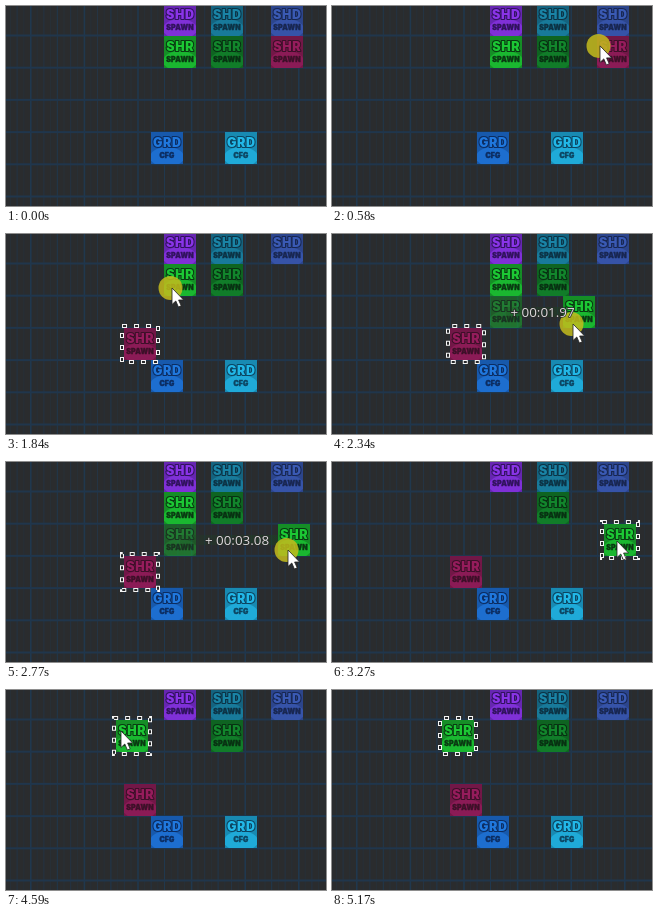
An HTML page for the animation above (5.26 s loop, 320 by 200 pixels).

```html
<!DOCTYPE html>
<html lang="en">
<head>
<meta charset="utf-8">
<title>Timeline drag</title>
<style>
  html, body { margin: 0; width: 100%; height: 100%; overflow: hidden; background: #2a2c2e; }
  svg { display: block; width: 320px; height: 200px; }
  text { text-anchor: middle; paint-order: stroke; stroke-linejoin: round; }
  .name { font: 900 12.5px Inter, sans-serif; letter-spacing: .6px; stroke-width: 2px; }
  .kind { font: 900 7px Inter, sans-serif; letter-spacing: .2px; stroke-width: .4px; }
  #label { font: 13.4px "Open Sans", sans-serif; fill: #dcdcdc; stroke: #2a2a2a; stroke-width: 1.5px; }
</style>
</head>
<body>
<svg id="stage" viewBox="0 0 320 200">
  <defs>
    <linearGradient id="minus">
      <stop offset="0" stop-color="#74181a"/>
      <stop offset=".75" stop-color="#941416"/>
      <stop offset="1" stop-color="#941416" stop-opacity=".5"/>
    </linearGradient>
    <linearGradient id="plus">
      <stop offset="0" stop-color="#1c4222" stop-opacity=".2"/>
      <stop offset="1" stop-color="#1c4222" stop-opacity=".6"/>
    </linearGradient>
    <clipPath id="tile"><rect width="32" height="32"/></clipPath>
  </defs>
  <g id="grid"></g>
  <g id="blocks"></g>
  <g id="drag">
    <g id="ghost" opacity=".5"></g>
    <rect id="bar" height="10"/>
    <g id="mover"></g>
  </g>
  <g id="select" fill="none">
    <rect width="36" height="36" stroke="#f4f4f4" stroke-width="4" stroke-dasharray="5 7"/>
    <rect width="36" height="36" stroke="#26282a" stroke-width="2" stroke-dasharray="3 9"/>
  </g>
  <g id="cursor">
    <circle id="press" cx="-1.5" r="12" fill="#c4bc1c" opacity=".85"/>
    <path d="M0 0V16.5L3.8 13 6.4 19 9.2 17.8 6.6 12H11.6Z" fill="#fff" stroke="#222" stroke-width=".8"/>
  </g>
  <text id="label"></text>
</svg>
<script>
const LOOP = 5260, STEP = 1000 / 12;
const $ = id => document.getElementById(id);

function add(parent, tag, attrs, text) {
  const el = document.createElementNS("http://www.w3.org/2000/svg", tag);
  for (const key in attrs) el.setAttribute(key, attrs[key]);
  if (text) el.textContent = text;
  parent.append(el);
  return el;
}

const place = (el, x, y) => el.setAttribute("transform", `translate(${x} ${y})`);
const show = (el, on) => el.setAttribute("visibility", on ? "visible" : "hidden");

// Timeline grid: nested beat divisions, then tracks
for (let i = 0; i < 48; i++) {
  const fill = i % 4 === 0 ? "#20384e" : i % 2 === 0 ? "#243444" : "#273038";
  add($("grid"), "rect", { x: -2.8 + i * 6.7, y: 0, width: i % 8 === 4 ? 1.6 : 1, height: 200, fill });
}
for (let y = 29; y < 200; y += 32.2) {
  add($("grid"), "rect", { x: 0, y: y - .5, width: 320, height: 2, fill: "#20364c" });
}

function drawBlock(parent, name, kind, fill, ink) {
  const g = add(parent, "g", { "clip-path": "url(#tile)" });
  add(g, "rect", { width: 32, height: 32, fill });
  add(g, "rect", { width: 32, height: 32, fill: ink, opacity: .4 });
  add(g, "ellipse", { cx: 16, cy: 25, rx: 17, ry: 10, fill });
  add(g, "ellipse", { cx: 16, cy: 25, rx: 17, ry: 10, fill: ink, opacity: .12 });
  add(g, "text", { class: "name", x: 16.3, y: 14.6, fill, stroke: ink }, name);
  add(g, "text", { class: "kind", x: 16, y: 26.4, fill: ink, stroke: ink }, kind);
  return g;
}

const CRIMSON = ["SHR", "SPAWN", "#961c5c", "#3c1028"];
const GREEN = ["SHR", "SPAWN", "#1cc834", "#0a3812"];

function block(x, y, style) {
  const el = add($("blocks"), "g", {});
  drawBlock(el, ...style);
  place(el, x, y);
  return el;
}

block(158, -2, ["SHD", "SPAWN", "#8a34e8", "#30125c"]);
block(205, -2, ["SHD", "SPAWN", "#1a84a6", "#0c3244"]);
block(265, -2, ["SHD", "SPAWN", "#3a5ab4", "#182650"]);
block(205, 30, ["SHR", "SPAWN", "#12862c", "#083012"]);
block(145, 126, ["GRD", "CFG", "#2078de", "#0c2c60"]);
block(219, 126, ["GRD", "CFG", "#22b8e8", "#0c4460"]);
const crimson = block(265, 30, CRIMSON);
const green = block(158, 30, GREEN);

const ghosts = {}, movers = {};
for (const [key, style] of [["crimson", CRIMSON], ["green", GREEN]]) {
  ghosts[key] = drawBlock($("ghost"), ...style);
  movers[key] = drawBlock($("mover"), ...style);
}

// Cursor tip: time, x, y
const path = [
  [80, 334, 84], [420, 268, 36], [520, 268, 40], [660, 262, 98], [1010, 128, 98],
  [1170, 121, 98], [1340, 121, 98], [1750, 166, 54], [1840, 166, 54], [1920, 168, 56],
  [2040, 170, 90], [2340, 241, 90], [2610, 282, 88], [2850, 282, 88], [3270, 285, 79],
  [3430, 277, 73], [3510, 277, 73], [4010, 123, 73], [4330, 115, 41], [4600, 115, 41],
  [5090, 60, -24]
];

// press, start and drop times; grip is the cursor's offset inside the block
const drags = [
  { key: "crimson", press: 420, start: 500, drop: 1340, from: [265, 30], to: [118, 94], grip: 3, rate: 2.85 / 140 },
  { key: "green", press: 1750, start: 1910, drop: 2850, from: [158, 30], to: [272, 62], grip: 10, rate: 1.97 / 73 },
  { key: "green", press: 3430, start: 3500, drop: 4580, from: [272, 62], to: [110, 30], grip: 5, rate: 2.03 / 154 }
];

function tipAt(t) {
  const i = path.findIndex(p => p[0] > t);
  if (i < 1) return path[i < 0 ? path.length - 1 : 0].slice(1);
  const [t0, x0, y0] = path[i - 1], [t1, x1, y1] = path[i];
  const u = (t - t0) / (t1 - t0), e = u * u * (3 - 2 * u);
  return [x0 + (x1 - x0) * e, y0 + (y1 - y0) * e];
}

function drawDrag(d, tipX, tipY) {
  show($("drag"), d);
  show($("label"), false);
  if (!d) return;
  const [x0, y0] = d.from;
  const x = tipX - d.grip, y = 30 + 32 * Math.floor((tipY - 30) / 32), dx = x - x0;
  for (const key in movers) {
    const display = key === d.key ? "inline" : "none";
    movers[key].style.display = ghosts[key].style.display = display;
  }
  place($("ghost"), x0, y);
  $("ghost").style.display = y === y0 ? "none" : "inline";
  place($("mover"), x, y);

  const bar = $("bar");
  bar.setAttribute("x", Math.min(x, x0) + 16);
  bar.setAttribute("y", y + 11);
  bar.setAttribute("width", Math.abs(dx));
  bar.setAttribute("fill", dx < 0 ? "url(#minus)" : "url(#plus)");

  const seconds = Math.abs(dx) * d.rate;
  if (seconds < .005) return;
  show($("label"), true);
  $("label").textContent = `${dx < 0 ? "-" : "+"} 00:${seconds.toFixed(2).padStart(5, "0")}`;
  place($("label"), (x + x0) / 2 + 16, y + 20.7);
}

function render(t) {
  const [x, y] = tipAt(t);
  const spots = { crimson: drags[0].from, green: drags[1].from };
  let selected = null;
  for (const d of drags) {
    if (t >= d.drop) selected = spots[d.key] = d.to;
  }
  place(crimson, ...spots.crimson);
  place(green, ...spots.green);

  drawDrag(drags.find(d => t >= d.start && t < d.drop), x, y);

  show($("select"), selected);
  if (selected) {
    place($("select"), selected[0] - 2, selected[1] - 2);
    const phase = (t - 1840) * .0084;
    const [outer, inner] = $("select").children;
    outer.setAttribute("stroke-dashoffset", -phase);
    inner.setAttribute("stroke-dashoffset", -phase - 1);
  }

  show($("cursor"), t > 80 && t < 5090);
  place($("cursor"), x, y);
  $("press").style.display = drags.some(d => t >= d.press && t < d.drop) ? "inline" : "none";
}

const begin = performance.now();
function tick() {
  const t = (performance.now() - begin) % LOOP;
  render(Math.floor(t / STEP) * STEP + 10);
  requestAnimationFrame(tick);
}
tick();
</script>
</body>
</html>
```
